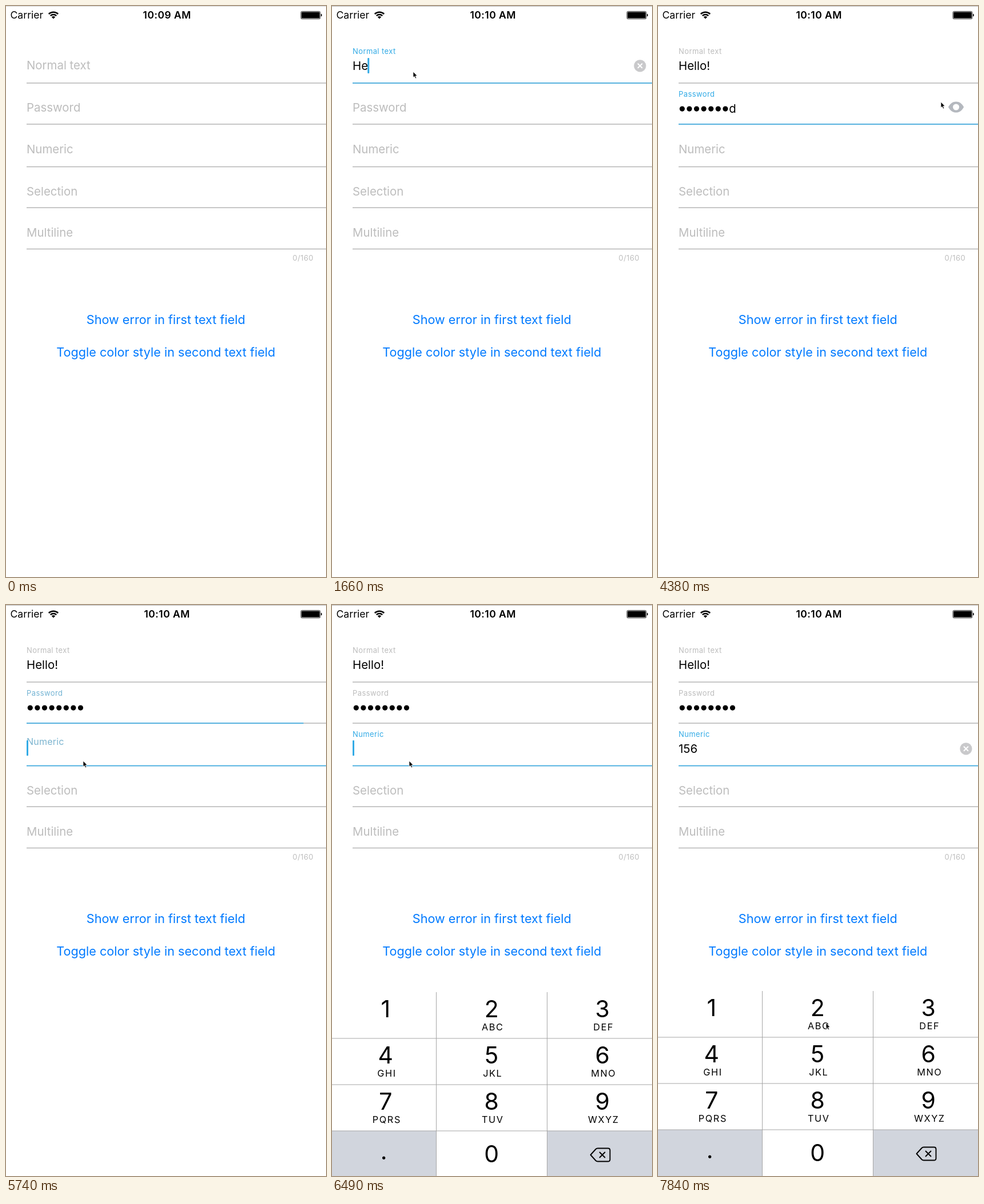
Recreate the animation shown at these times as an HTML page. Size 560 by 1000 pixels, loop 7.99 s.

```html
<!DOCTYPE html>
<html lang="en">
<head>
<meta charset="utf-8">
<title>Animated text inputs</title>
<style>
html, body { margin: 0; width: 100%; height: 100%; overflow: hidden; background: #fff; }
svg { display: block; width: 560px; height: 1000px; font-family: Inter, Roboto, sans-serif; }
.mid { text-anchor: middle; }
.link { font-size: 21.65px; fill: #007aff; text-anchor: middle; }
.value { font-size: 20.4px; }
.digit { font-size: 41px; text-anchor: middle; }
.abc { font-size: 16.3px; letter-spacing: 1.6px; text-anchor: middle; }
</style>
</head>
<body>
<svg id="stage" viewBox="0 0 560 1000">
  <rect width="560" height="1000" fill="#fff"/>
  <rect id="topline" width="560" height="1"/>
  <text x="7.5" y="22.3" font-size="17.6">Carrier</text>
  <g fill="none" stroke="#000" stroke-width="2.5">
    <path d="M74.8 14A11.8 11.8 0 0 1 91.2 14"/>
    <path d="M77.8 17.2A7.4 7.4 0 0 1 88.2 17.2"/>
  </g>
  <path d="M83 22.6l-3.2-3.4a4.6 4.6 0 0 1 6.4 0z"/>
  <text id="clock" class="mid" x="281.7" y="22.3" font-size="17.6" font-weight="600" letter-spacing=".4"></text>
  <rect x="515.8" y="9.4" width="34.4" height="13.4" rx="2.4" fill="none" stroke="#444" stroke-width="1"/>
  <rect x="517" y="10.6" width="32" height="11" rx="1.2"/>
  <path d="M551.2 13.6q1.8 .6 1.8 2.5t-1.8 2.5z"/>
  <g id="fields"></g>
  <text x="538" y="446" font-size="13" letter-spacing=".4" text-anchor="end" fill="#bdbdbd">0/160</text>
  <text class="link" x="279.8" y="557.2">Show error in first text field</text>
  <text class="link" x="279.8" y="614.2">Toggle color style in second text field</text>
  <g id="eye">
    <path d="M508 177C511.5 170.5 516 167.4 521.6 167.4S531.7 170.5 535.2 177C531.7 183.5 527.2 186.6 521.6 186.6S511.5 183.5 508 177z" fill="#b4b8be"/>
    <circle cx="521.6" cy="177" r="5.5" fill="#fff"/>
  </g>
  <g id="clear">
    <circle r="10.6" fill="#c9c9cb"/>
    <path d="M-4 -4L4 4M4 -4L-4 4" stroke="#fff" stroke-width="2"/>
  </g>
  <rect id="caret" width="3" rx="1" fill="#33abe6"/>
  <g id="pad"></g>
  <path id="mouse" d="M0 0V10.2L2.3 8.2 4 12 5.7 11.2 4.1 7.5H7.2z" fill="#000" stroke="#fff" stroke-width=".8"/>
</svg>
<script>
const LOOP = 7990, STEP = 150, LEFT = 36, WIDTH = 524;
// Runs of evenly spaced picture changes: [first time, count]
const RUNS = [[460, 11], [2420, 10], [4080, 5], [5140, 19]];
const GREY = [189, 189, 189], BLUE = [51, 171, 230];
const $ = id => document.getElementById(id);

function add(parent, tag, attrs, text) {
  const node = document.createElementNS('http://www.w3.org/2000/svg', tag);
  set(node, attrs);
  if (text) node.textContent = text;
  return parent.appendChild(node);
}
function set(node, attrs) {
  for (const k in attrs) node.setAttribute(k, attrs[k]);
}
const show = (node, on) => set(node, { visibility: on ? 'visible' : 'hidden' });
const clamp = x => Math.min(1, Math.max(0, x));
const lerp = (a, b, p) => a + (b - a) * p;
const mix = p => `rgb(${GREY.map((c, i) => Math.round(lerp(c, BLUE[i], p)))})`;

const FIELDS = [
  { name: 'Normal text', base: 110.7, small: 84, line: 134.2, value: 112.4, caret: [91, 27], on: 850, off: 2660 },
  { name: 'Password', base: 185.3, small: 159, line: 206.2, value: 187.4, caret: [166, 23], on: 2660, off: 5680 },
  { name: 'Numeric', base: 257.5, small: 231, line: 280.8, value: 259.4, caret: [237, 27], on: 5680, instant: true },
  { name: 'Selection', base: 332.1, line: 352.5 },
  { name: 'Multiline', base: 404.1, line: 424.8 }
];
const TYPED = [
  [[0, ''], [1510, 'H'], [1660, 'He'], [1810, 'Hell'], [1960, 'Hello!']],
  [[0, ''], [3320, 'pa'], [3470, 'pass'], [3620, 'passwo'], [3770, 'password']],
  [[0, ''], [6940, '1'], [7090, '15'], [7540, '156']]
];
const CARET = [[0, 0], [910, 1], [1360, 0], [1510, 1], [4080, 0], [4530, 1], [4680, 0], [5740, 1], [7690, 0]];
const PRESSED = [[0, 0], [6790, 1], [6940, 0], [7090, 5], [7240, 0], [7390, 6], [7540, 0]];
const MOUSE = [
  [460, 190, 60], [610, 152, 106], [760, 142, 115], [2270, 142, 115], [2420, 134, 141], [2570, 112, 181],
  [3770, 112, 181], [4080, 250, 176], [4230, 420, 170], [4380, 495, 168], [4530, 514, 174], [5140, 430, 190],
  [5290, 290, 232], [5440, 170, 264], [5590, 135, 273], [6490, 135, 273], [6640, 110, 520], [6790, 95, 715],
  [6940, 190, 770], [7090, 281, 796], [7240, 390, 800], [7390, 468, 797], [7540, 460, 785], [7690, 375, 735], [7840, 294, 732]
];

function hold(table, t) {
  let v = table[0][1];
  for (const [start, next] of table) if (t >= start) v = next;
  return v;
}
function pointer(t) {
  const i = MOUSE.findIndex(k => k[0] > t);
  if (i < 0) return MOUSE[MOUSE.length - 1].slice(1);
  const a = MOUSE[i - 1], b = MOUSE[i], p = (t - a[0]) / (b[0] - a[0]);
  return [lerp(a[1], b[1], p), lerp(a[2], b[2], p)];
}
function snap(t) {
  let s = 0;
  for (const [start, n] of RUNS)
    if (t >= start) s = start + STEP * Math.min(n - 1, Math.floor((t - start) / STEP));
  return s;
}

for (const f of FIELDS) {
  const g = $('fields'), bar = { x: LEFT, y: f.line, height: 1.5 };
  add(g, 'rect', { ...bar, width: WIDTH, fill: '#b5b5b5' });
  f.bar = add(g, 'rect', { ...bar, width: 0, fill: mix(1) });
  f.label = add(g, 'text', { x: LEFT }, f.name);
  f.text = add(g, 'text', { x: LEFT, y: f.value || 0, class: 'value' });
}
const dots = Array.from({ length: 8 }, (_, i) =>
  add($('fields'), 'circle', { cx: 42.3 + 12.6 * i, cy: 180.1, r: 4.6 }));

// Number pad, laid out from its own top edge
const pad = $('pad'), keys = [];
const COLS = [[0, 182], [183, 193], [377, 183]], MIDS = [93.8, 279.2, 473.2];
const LETTERS = ['', 'ABC', 'DEF', 'GHI', 'JKL', 'MNO', 'PQRS', 'TUV', 'WXYZ'];
add(pad, 'rect', { width: 560, height: 324, fill: '#fff' });
for (let i = 0; i < 12; i++) {
  const c = i % 3, y = Math.floor(i / 3) * 81, last = i > 8;
  keys.push(add(pad, 'rect', { x: COLS[c][0], y, width: COLS[c][1], height: 81, fill: last && c !== 1 ? '#d1d5dd' : '#fff' }));
  if (!last) {
    add(pad, 'text', { x: MIDS[c], y: y + 44.2, class: 'digit' }, String(i + 1));
    add(pad, 'text', { x: MIDS[c] + 2.1, y: y + 67.2, class: 'abc' }, LETTERS[i]);
  }
}
add(pad, 'text', { x: MIDS[1], y: 298.2, class: 'digit' }, '0');
add(pad, 'text', { x: 90.7, y: 293, class: 'digit' }, '.');
add(pad, 'path', {
  d: 'M452.5 285L461.5 275Q463 273.5 465 273.5H483Q486.500 273.5 486.5 277V293Q486.5 296.5 483 296.5H465Q463 296.5 461.5 295zM468 280L478 290M478 280L468 290',
  fill: 'none', stroke: '#000', 'stroke-width': 1.9, 'stroke-linejoin': 'round'
});
for (const x of [182, 376]) add(pad, 'rect', { x, width: 1, height: 324, fill: '#a6a6a6' });
for (const y of [80.5, 161.5, 242.5]) add(pad, 'rect', { y, width: 560, height: 1, fill: '#a6a6a6' });

function draw(s) {
  const started = s >= 460;
  set($('topline'), { fill: started ? '#bababa' : '#d6d6d6' });
  $('clock').textContent = started ? '10:10 AM' : '10:09 AM';

  let active = -1;
  FIELDS.forEach((f, i) => {
    const since = s - (f.on || Infinity), gone = s - (f.off || Infinity);
    if (since >= 0 && gone < 0) active = i;
    const rise = clamp(since / 130), tone = rise - clamp(gone / 130);
    const grow = f.instant ? +(since >= 0) : clamp((since - 44) / 213);
    set(f.bar, { width: WIDTH * (grow - clamp((gone - 44) / 213)) });
    set(f.label, {
      y: lerp(f.base, f.small || f.base, rise),
      'font-size': lerp(20.4, 13, rise ** 0.7),
      'letter-spacing': 0.4 * rise,
      fill: mix(tone)
    });
  });

  const words = TYPED.map(t => hold(t, s)), secret = words[1];
  const masked = s >= 4530 ? secret.length : Math.max(0, secret.length - 1);
  FIELDS[0].text.textContent = words[0];
  FIELDS[1].text.textContent = secret.slice(masked);
  set(FIELDS[1].text, { x: LEFT + 12.6 * masked });
  FIELDS[2].text.textContent = words[2];
  dots.forEach((d, i) => show(d, i < masked));

  const f = FIELDS[active];
  show($('eye'), active === 1);
  show($('clear'), f && active !== 1 && words[active]);
  show($('caret'), f && hold(CARET, s));
  if (f) {
    const indent = active === 1 ? 12.6 * masked : 0;
    const end = LEFT + indent + (f.text.textContent ? f.text.getComputedTextLength() - 0.8 : 0);
    set($('caret'), { x: end, y: f.caret[0], height: f.caret[1] });
    set($('clear'), { transform: `translate(539 ${f.value - 7.6})` });
  }

  // The pad settles like a critically damped spring
  const w = 18 * (s - 6090) / 1000;
  const drop = w > 0 ? 324 * (1 + w) * Math.exp(-w) : 324;
  set(pad, { transform: `translate(0 ${676 + Math.round(drop)})` });
  const pressed = hold(PRESSED, s);
  for (let i = 0; i < 9; i++) set(keys[i], { fill: pressed === i + 1 ? '#d1d5dd' : '#fff' });

  show($('mouse'), started);
  if (started) set($('mouse'), { transform: `translate(${pointer(s)})` });
}

function tick() {
  draw(snap(performance.now() % LOOP));
  requestAnimationFrame(tick);
}
tick();
</script>
</body>
</html>
```
